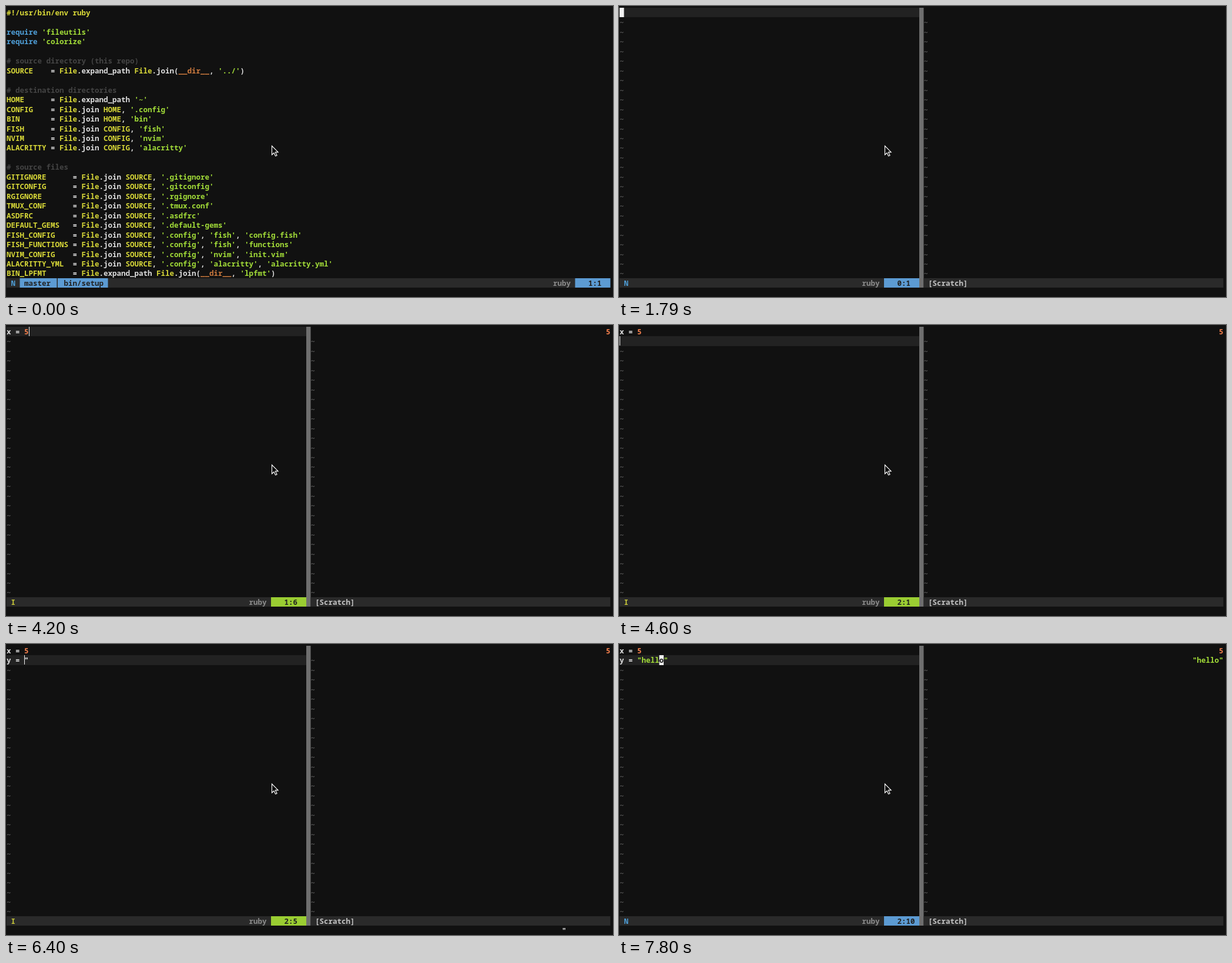
Write an HTML page with a canvas that moves like this. It is 1033 by 496 pixels and loops after 8000 ms.

```html
<!DOCTYPE html>
<html lang="en">
<head>
<meta charset="utf-8">
<style>
html, body { margin: 0; width: 100%; height: 100%; overflow: hidden; background: #111; }
canvas { display: block; }
</style>
</head>
<body>
<canvas id="stage" width="1033" height="496"></canvas>
<script>
const ctx = document.getElementById('stage').getContext('2d');
const LOOP = 8000, COLS = 137, SPLIT = 68, STATUS_ROW = 28;
const C = {
  bg: '#111111', line: '#222222', bar: '#2a2a2a', rule: '#6e6e6e', tilde: '#5a5a5a',
  text: '#dedede', dim: '#8c8c8c', comment: '#444444', yellow: '#d8d838', blue: '#4f9fd8',
  block: '#5c9bd3', green: '#9acd32', string: '#a2dc38', orange: '#f5804e', brown: '#cc7a3e',
  cursor: '#f2f2f2'
};

const SCRIPT = `#!/usr/bin/env ruby

require 'fileutils'
require 'colorize'

# source directory (this repo)
SOURCE    = File.expand_path File.join(__dir__, '../')

# destination directories
HOME      = File.expand_path '~'
CONFIG    = File.join HOME, '.config'
BIN       = File.join HOME, 'bin'
FISH      = File.join CONFIG, 'fish'
NVIM      = File.join CONFIG, 'nvim'
ALACRITTY = File.join CONFIG, 'alacritty'

# source files
GITIGNORE      = File.join SOURCE, '.gitignore'
GITCONFIG      = File.join SOURCE, '.gitconfig'
RGIGNORE       = File.join SOURCE, '.rgignore'
TMUX_CONF      = File.join SOURCE, '.tmux.conf'
ASDFRC         = File.join SOURCE, '.asdfrc'
DEFAULT_GEMS   = File.join SOURCE, '.default-gems'
FISH_CONFIG    = File.join SOURCE, '.config', 'fish', 'config.fish'
FISH_FUNCTIONS = File.join SOURCE, '.config', 'fish', 'functions'
NVIM_CONFIG    = File.join SOURCE, '.config', 'nvim', 'init.vim'
ALACRITTY_YML  = File.join SOURCE, '.config', 'alacritty', 'alacritty.yml'
BIN_LPFMT      = File.expand_path File.join(__dir__, 'lpfmt')`.split('\n');

// Each step overrides part of the editor state from its time on.
const STEPS = [
  [0, { view: 'script', lines: SCRIPT, mode: 'N', cursor: '', col: 0, results: [], pending: '' }],
  [200, { cursor: 'block' }],
  [1790, { view: 'split', lines: [''] }],
  [2600, { cursor: 'beam' }],
  [2800, { mode: 'I' }],
  [3200, { lines: ['x'], col: 1 }],
  [3400, { lines: ['x '], col: 2 }],
  [3600, { lines: ['x = '], col: 4 }],
  [3800, { lines: ['x = 5'], col: 5 }],
  [4200, { results: ['5'] }],
  [4600, { lines: ['x = 5', ''], col: 0 }],
  [5400, { lines: ['x = 5', 'y'], col: 1 }],
  [5800, { lines: ['x = 5', 'y '], col: 2 }],
  [6000, { lines: ['x = 5', 'y = '], col: 4 }],
  [6400, { lines: ['x = 5', 'y = "'], pending: '"' }],
  [6600, { lines: ['x = 5', 'y = ""'], col: 5, pending: '' }],
  [6800, { lines: ['x = 5', 'y = "h"'], col: 6 }],
  [7000, { lines: ['x = 5', 'y = "he"'], col: 7 }],
  [7200, { lines: ['x = 5', 'y = "hell"'], col: 9 }],
  [7400, { lines: ['x = 5', 'y = "hello"'], col: 10 }],
  [7600, { mode: 'N', cursor: 'block', col: 9 }],
  [7800, { results: ['5', '"hello"'] }]
];

const stateAt = time =>
  Object.assign({}, ...STEPS.filter(([start]) => start <= time).map(([, change]) => change));

const x = col => 1 + col * 7.5;
const y = row => Math.round(3 + row * 16.46);

function fill(color, col, row, cols, rows = 1) {
  ctx.fillStyle = color;
  ctx.fillRect(x(col), y(row), cols * 7.5, y(row + rows) - y(row));
}

function write(text, col, row, color) {
  ctx.fillStyle = color;
  ctx.fillText(text, x(col), y(row) + 13);
}

const TOKENS = [
  [/^#!.*/, C.yellow], [/^#.*/, C.comment],
  [/^'[^']*'|^"[^"]*"/, C.string], [/^require/, C.blue],
  [/^__dir__/, C.brown], [/^[A-Z]\w*/, C.yellow],
  [/^\d+/, C.orange], [/^[a-z]\w*/, C.text], [/^ +/, C.text], [/^./, C.text]
];

function writeCode(line, col, row) {
  while (line) {
    const [pattern, color] = TOKENS.find(([p]) => p.test(line));
    const token = line.match(pattern)[0];
    write(token, col, row, color);
    col += token.length;
    line = line.slice(token.length);
  }
}

function drawTildes(col, from) {
  for (let row = from; row < STATUS_ROW; row++) write('~', col, row, C.tilde);
}

function drawStatus(state, width, position) {
  const insert = state.mode === 'I';
  fill(C.bar, 0, STATUS_ROW, width);
  write(state.mode, 1, STATUS_ROW, insert ? '#c9c938' : C.blue);
  write('ruby', width - 13, STATUS_ROW, C.dim);
  fill(insert ? C.green : C.block, width - 8, STATUS_ROW, 8);
  write(position, width - 5, STATUS_ROW, C.line);
}

function drawCursor({ cursor, lines, col }, row) {
  if (cursor === 'block') {
    fill(C.cursor, col, row, 1);
    write(lines[row][col] || '', col, row, C.bg);
  } else if (cursor === 'beam') {
    ctx.fillStyle = C.cursor;
    ctx.fillRect(Math.round(x(col)), y(row), 1, 16);
  }
}

function drawScratch(results) {
  fill(C.rule, SPLIT, 0, 1, STATUS_ROW + 1);
  drawTildes(SPLIT + 1, Math.max(1, results.length));
  results.forEach((result, row) => writeCode(result, COLS - result.length, row));
  fill(C.bar, SPLIT + 1, STATUS_ROW, COLS - SPLIT - 1);
  write('[Scratch]', SPLIT + 2, STATUS_ROW, '#c6c6c6');
}

function drawBranch() {
  fill(C.block, 3, STATUS_ROW, 20);
  ctx.fillStyle = C.bar;
  ctx.fillRect(86.5, y(STATUS_ROW), 1.5, 16);
  write('master', 4, STATUS_ROW, C.line);
  write('bin/setup', 13, STATUS_ROW, C.line);
}

function drawPointer() {
  const arrow = new Path2D('M452.5 238.5V253.5L456 250.2L458.6 255.8L461 254.7L458.4 249.2H463Z');
  ctx.fillStyle = '#000';
  ctx.fill(arrow);
  ctx.strokeStyle = '#fff';
  ctx.lineWidth = 1.2;
  ctx.stroke(arrow);
}

function draw(time) {
  const state = stateAt(time);
  const split = state.view === 'split';
  const width = split ? SPLIT : COLS;
  const row = split ? state.lines.length - 1 : 0;
  const lineNumber = state.lines.join('') ? row + 1 : 0;

  ctx.font = 'bold 12.5px "Noto Sans Mono", monospace';
  ctx.fillStyle = C.bg;
  ctx.fillRect(0, 0, 1033, 496);
  if (state.cursor) fill(C.line, 0, row, width);
  state.lines.forEach((line, i) => writeCode(line, 0, i));
  drawStatus(state, width, `${lineNumber}:${state.col + 1}`);
  if (split) {
    drawTildes(0, state.lines.length);
    drawScratch(state.results);
  } else {
    drawBranch();
  }
  write(state.pending, 126, STATUS_ROW + 1, C.text);
  drawCursor(state, row);
  drawPointer();
}

const began = performance.now();
function tick() {
  draw((performance.now() - began) % LOOP);
  requestAnimationFrame(tick);
}
tick();
</script>
</body>
</html>
```
